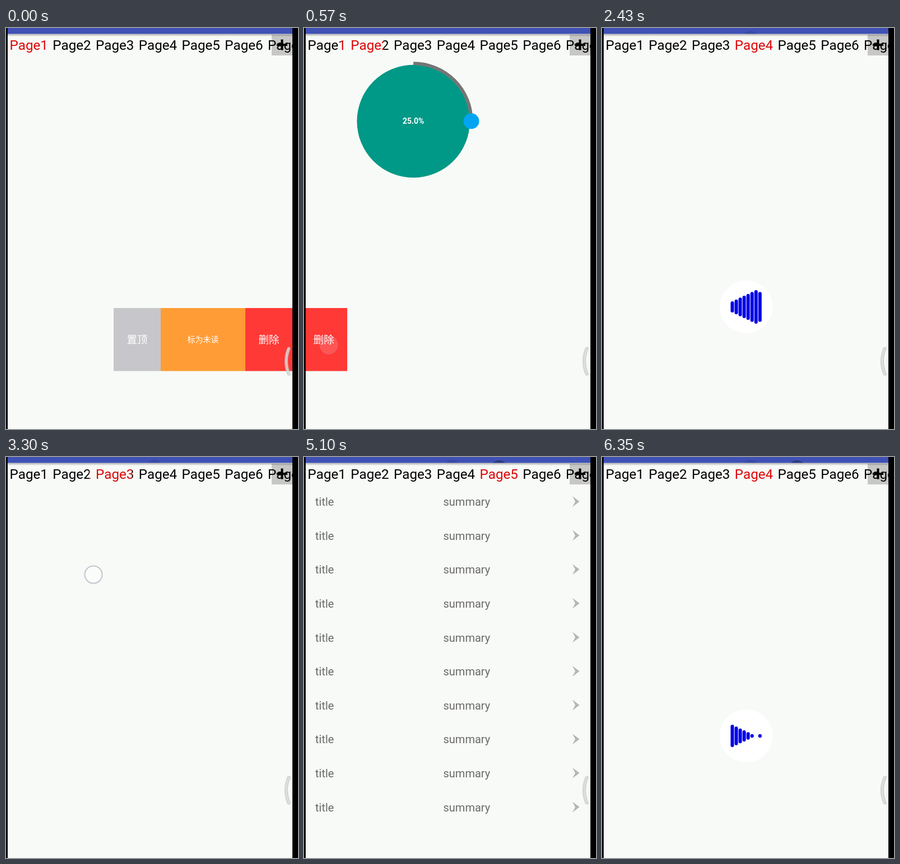
These frames come from a looping animation (521 px wide and 716 px high, 6750 ms). An HTML page:

```html
<!DOCTYPE html>
<html lang="en">
<head>
<meta charset="utf-8">
<title>Pager with tabs</title>
<style>
  html, body { margin: 0; width: 100%; height: 100%; overflow: hidden; background: #000; }
  svg { display: block; width: 100vw; height: 100vh; }
  text { font-family: Roboto, "Noto Sans CJK SC", "Noto Sans CJK", sans-serif; }
</style>
</head>
<body>
<svg id="stage" viewBox="0 0 521 716">
  <defs>
    <clipPath id="screen"><rect x="3" width="508" height="716"/></clipPath>
    <clipPath id="barClip"><rect x="3" width="508" height="10.5"/></clipPath>
    <linearGradient id="shade" x2="0" y2="1">
      <stop offset="0" stop-color="#000" stop-opacity=".3"/>
      <stop offset="1" stop-color="#000" stop-opacity="0"/>
    </linearGradient>
  </defs>
  <rect width="521" height="716"/>
  <g clip-path="url(#screen)">
    <rect x="3" width="508" height="716" fill="#f8faf7"/>
    <g id="pages"></g>
    <rect x="3" y="10.5" width="508" height="5" fill="url(#shade)"/>
    <rect x="3" width="508" height="10.5" fill="#3f51b5"/>
    <g id="marks" clip-path="url(#barClip)"></g>
    <g id="tabs"></g>
    <rect x="474" y="12" width="37" height="37" fill="#000" fill-opacity=".2"/>
    <path d="M483 30H502M492.500 20.500V39.500" stroke="#000" stroke-width="4"/>
    <g fill="none" stroke-linecap="round" opacity=".85">
      <path d="M504.500 572.500Q495.500 595 504.500 617.500" stroke="#bfc1bf" stroke-width="6"/>
      <path d="M504.500 572.500Q495.500 595 504.500 617.500" stroke="#d8dad8" stroke-width="4"/>
    </g>
    <circle id="touch" r="15.500" fill="#fff" fill-opacity=".55" stroke="#c3c3cf" stroke-width="2"/>
  </g>
</svg>
<script>
const LOOP = 6750, PAGE_W = 508, TAB_STEP = 76.75, RED = "#dc0808";
const byId = id => document.getElementById(id);

function add(parent, tag, attrs, text) {
  const el = document.createElementNS("http://www.w3.org/2000/svg", tag);
  for (const k in attrs) el.setAttribute(k, attrs[k]);
  if (text) el.textContent = text;
  parent.appendChild(el);
  return el;
}

// Tabs: a hard-edged gradient colours part of each label
const tabStops = Array.from({ length: 7 }, (_, i) => {
  const x = 6.6 + TAB_STEP * i;
  const grad = add(byId("tabs"), "linearGradient",
    { id: "tab" + i, gradientUnits: "userSpaceOnUse", x1: x, x2: x + 68.5, y1: 0, y2: 0 });
  add(byId("tabs"), "text", { x, y: 38.5, "font-size": 24.2, fill: `url(#tab${i})` }, "Page" + (i + 1));
  return ["#000", RED, RED, "#000"].map(c => add(grad, "stop", { "stop-color": c }));
});

const pages = Array.from({ length: 5 }, () => add(byId("pages"), "g", {}));

// Page 1: swipe actions
[[192, 84, "#c7c6cb", 18.5, "置顶"],
 [276, 151, "#ff9c35", 14, "标为未读"],
 [427, 84, "#ff3936", 18.5, "删除"]].forEach(([x, width, fill, size, label]) => {
  add(pages[0], "rect", { x, y: 500, width, height: 112.5, fill });
  add(pages[0], "text", { x: x + width / 2, y: 556 + size * 0.38, "font-size": size,
    fill: "#fff", "text-anchor": "middle" }, label);
});

// Page 2: progress dial
add(pages[1], "circle", { cx: 121, cy: 166.5, r: 100.7, fill: "#009886" });
add(pages[1], "path", { d: "M121 63.200A103.300 103.300 0 0 1 224.300 166.500", fill: "none",
  stroke: "#757575", "stroke-width": 6 });
add(pages[1], "circle", { cx: 224.3, cy: 166.3, r: 14, fill: "#03a5f2" });
add(pages[1], "text", { x: 121, y: 171.3, "font-size": 14, "font-weight": 700, fill: "#fff",
  "text-anchor": "middle" }, "25.0%");

// Page 4: wave of bars
add(pages[3], "circle", { cx: 257.3, cy: 498, r: 47.2, fill: "#fff" });
const bars = Array.from({ length: 8 }, (_, i) => add(pages[3], "path",
  { "data-x": 232.5 + 7.05 * i, stroke: "#0000e8", "stroke-width": 6, "stroke-linecap": "round" }));

// Page 5: list
for (let i = 0; i < 10; i++) {
  const row = add(pages[4], "g", { transform: `translate(0 ${60.6 * i})`, fill: "#6a6b6a", "font-size": 20 });
  add(row, "text", { x: 20, y: 87.3 }, "title");
  add(row, "text", { x: 248.5, y: 87.3 }, "summary");
  add(row, "path", { d: "M479 70L491.500 79.500L479 89L484 79.500Z", fill: "#b4b5b4" });
}

// Traces the taps leave on the bar
const marks = [[265, 21, 0.1, 1650], [348, 22, 0.3, 4480]].map(([cx, cy, o, from]) =>
  ({ el: add(byId("marks"), "circle", { cx, cy, r: 16, "fill-opacity": o }), from }));

const linear = u => u;
const settle = u => 1 - (1 - u) ** 5;

// start, end, from page, to page, easing
const moves = [
  [250, 570, 0, 0.854, linear], [640, 1040, 0.854, 1, settle],
  [1650, 2250, 1, 3, settle],
  [2510, 2830, 3, 2.45, linear], [2830, 3200, 2.45, 2, settle],
  [3280, 3530, 2, 1.39, linear], [3530, 3920, 1.39, 1, settle],
  [4480, 5080, 1, 4, settle],
  [5720, 5960, 4, 3.4, linear], [5960, 6270, 3.4, 3, settle]
];

// start, end, x, y, page at touch-down
const touches = [
  [170, 610, 478, 566, 0], [1490, 1640, 266, 29.5, 1], [2510, 2830, 150, 210, 3],
  [3200, 3530, 130, 210, 2], [4320, 4470, 348, 25, 1], [5660, 5960, 130, 560, 4]
];

const clamp = v => Math.min(1, Math.max(0, v));

function position(t) {
  let p = 0;
  for (const [a, b, from, to, ease] of moves)
    if (t >= a) p = from + (to - from) * ease(clamp((t - a) / (b - a)));
  return p;
}

function drawBars(t) {
  const phase = 12 + Math.ceil(Math.max(0, 6350 - t) / 87.2);
  bars.forEach((bar, i) => {
    const k = (phase + i) % 18, level = Math.min(k, 18 - k);
    const half = Math.max(0.01, level * 3.33 - 3);
    bar.setAttribute("d", `M${bar.dataset.x} ${498 - half}v${2 * half}`);
    bar.setAttribute("visibility", level ? "inherit" : "hidden");
  });
}

function drawTouch(t, p) {
  const hit = touches.find(([a, b]) => t >= a && t < b);
  const el = byId("touch");
  el.setAttribute("visibility", hit ? "visible" : "hidden");
  if (!hit) return;
  const [, end, x, y, p0] = hit;
  el.setAttribute("cx", x - (p - p0) * PAGE_W);
  el.setAttribute("cy", y);
  el.setAttribute("opacity", clamp((end - t) / 150));
}

function draw(t) {
  const p = position(t);
  pages.forEach((g, i) => {
    g.setAttribute("transform", `translate(${(i - p) * PAGE_W} 0)`);
    g.setAttribute("visibility", Math.abs(i - p) < 1 ? "visible" : "hidden");
  });
  tabStops.forEach((stops, i) => {
    const a = clamp(p - i), b = clamp(p - i + 1);
    [a, a, b, b].forEach((v, k) => stops[k].setAttribute("offset", v));
  });
  marks.forEach(m => m.el.setAttribute("visibility", t >= m.from ? "visible" : "hidden"));
  drawBars(t);
  drawTouch(t, p);
}

const begin = performance.now();
function tick() {
  draw((performance.now() - begin) % LOOP);
  requestAnimationFrame(tick);
}
tick();
</script>
</body>
</html>
```
